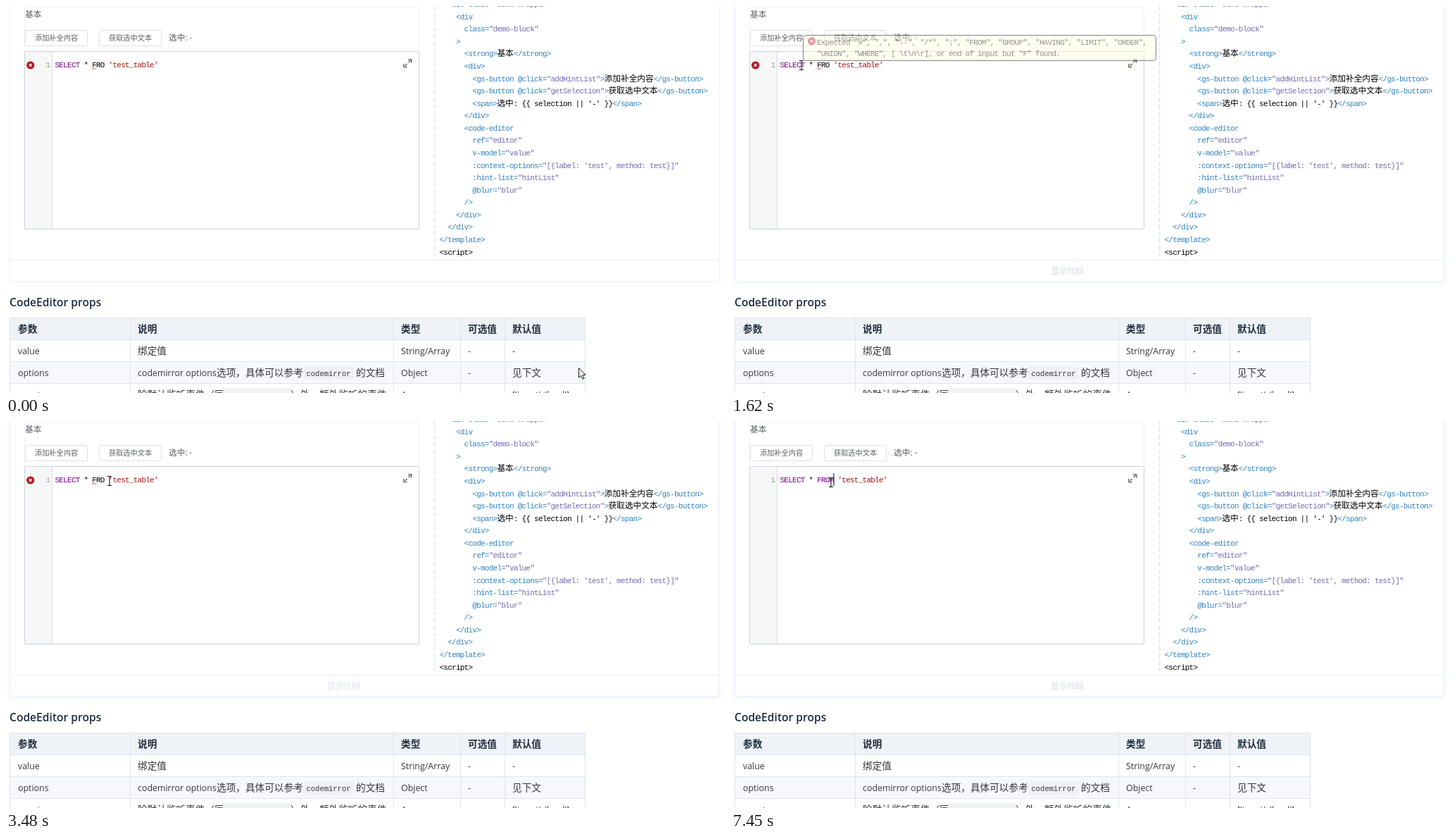
Recreate the animation shown at these times as an HTML page. Size 1021x549 px, loop 7.99 s.

```html
<!DOCTYPE html>
<html lang="zh">
<head>
<meta charset="utf-8">
<title>CodeEditor</title>
<style>
html, body { margin: 0; width: 100%; height: 100%; overflow: hidden; background: #fff; }
svg { display: block; }
text { white-space: pre; }
.ui { font: 12.4px 'Open Sans', 'Noto Sans', sans-serif; fill: #33363b; }
.ui .zh { font-family: 'Noto Sans CJK SC', 'Noto Sans CJK', sans-serif; font-size: 13.65px; }
.th { font-weight: 700; fill: #1f2d3d; }
.small { font: 11.7px 'Noto Sans CJK SC', 'Noto Sans CJK', sans-serif; fill: #5c5f66; }
.btn { font-size: 10.2px; }
.code { font: 11px 'Liberation Mono', monospace; letter-spacing: -.75px; }
.code .zh { font: 11.7px 'Noto Sans CJK SC', 'Noto Sans CJK', sans-serif; letter-spacing: 0; }
.chip { font: 10.5px 'Liberation Mono', monospace; fill: #33363b; }
.h { font: 600 15.6px 'Open Sans', 'Noto Sans', sans-serif; fill: #1f2d3d; }
#shadow { filter: drop-shadow(0 0 3px rgba(232,237,250,.6)) drop-shadow(0 2px 2px rgba(232,237,250,.5)); }
#hint { filter: drop-shadow(2px 3px 2px rgba(0,0,0,.2)); }
</style>
</head>
<body>
<svg id="stage" width="1021" height="549" viewBox="0 0 1021 549"></svg>
<script>
const LOOP = 7990;
const esc = s => s.replace(/&/g, '&amp;').replace(/</g, '&lt;').replace(/>/g, '&gt;');
const mix = s => esc(s).replace(/[\u3000-\u9fff\uff00-\uffef]+/g, m => `<tspan class="zh">${m}</tspan>`);
const run = (s, fill) => `<tspan fill="${fill}">${mix(s)}</tspan>`;
const text = (x, y, s, cls, more = '') => `<text x="${x}" y="${y}" class="${cls}" ${more}>${mix(s)}</text>`;
const rect = (x, y, w, h, fill, stroke = 'none', r = 0, more = '') =>
  `<rect x="${x}" y="${y}" width="${w}" height="${h}" rx="${r}" fill="${fill}" stroke="${stroke}" ${more}/>`;
const line = (d, stroke, more = '') => `<path d="${d}" fill="none" stroke="${stroke}" ${more}/>`;
const badge = (x, y, fill) => `<circle cx="${x}" cy="${y}" r="5.6" fill="${fill}"/>` +
  line(`M${x - 2} ${y - 2}l4 4m0-4l-4 4`, '#fff', 'stroke-width="1.2"');

// Template listing: [indent, text]
const listing = [
  [1, '<div class="demo-wrapper">'], [2, '<div'], [3, 'class="demo-block"'], [2, '>'],
  [3, '<strong>基本</strong>'], [3, '<div>'],
  [4, '<gs-button @click="addHintList">添加补全内容</gs-button>'],
  [4, '<gs-button @click="getSelection">获取选中文本</gs-button>'],
  [4, "<span>选中: {{ selection || '-' }}</span>"],
  [3, '</div>'], [3, '<code-editor'], [4, 'ref="editor"'], [4, 'v-model="value"'],
  [4, ':context-options="[{label: \'test\', method: test}]"'],
  [4, ':hint-list="hintList"'], [4, '@blur="blur"'], [3, '/>'],
  [2, '</div>'], [1, '</div>'], [0, '</template>']
];

function drawListing() {
  let inTag = false, out = '';
  listing.forEach(([indent, s], i) => {
    let runs = '';
    for (const part of s.match(/"[^"]*"|[<>]|[^"<>]+/g)) {
      if (part === '<') inTag = true;
      runs += run(part, !inTag ? '#000' : part[0] === '"' ? '#756bb1' : '#3182bd');
      if (part === '>') inTag = false;
    }
    out += `<text x="${615.5 + indent * 11.7}" y="${(1 + i * 17.58).toFixed(1)}" class="code">${runs}</text>`;
  });
  return out + text(615.5, 352.6, '<script>', 'code');
}

function drawTable() {
  const edge = '#dfe4ec';
  let out = rect(5.5, 442.5, 817, 31, '#eff2f7') + rect(5.5, 504.5, 817, 31, '#f7f8fc');
  out += line('M5.5 549V442.5H822.5V549M5.5 473.5H822.5M5.5 504.5H822.5M5.5 535.5H822.5' +
    [176, 550, 645, 708].map(x => `M${x}.5 442V549`).join(''), edge);
  const cols = [17, 187, 561, 656, 719];
  const row = (y, cells, cls) => cells.forEach((s, i) => out += text(cols[i], y, s, cls));
  row(463, ['参数', '说明', '类型', '可选值', '默认值'], 'ui th');
  row(494, ['value', '绑定值', 'String/Array', '-', '-'], 'ui');
  row(525, ['options', 'codemirror options', 'Object', '-', '见下文'], 'ui');
  row(556, ['events', '除默认监听事件（同', 'Array', '-', "['input', 'load']"], 'ui');
  out += text(299, 525, '选项，具体可以参考', 'ui') + rect(422, 511, 72, 19, '#eff1f5', 'none', 3) +
    text(426.5, 524.5, 'codemirror', 'chip') + text(497, 525, '的文档', 'ui');
  out += rect(308, 542, 97, 19, '#eff1f5', 'none', 3) + text(312, 555.5, 'onevents.Array', 'chip') +
    text(404, 556, '）外，额外监听的事件', 'ui');
  return out;
}

const button = (x, s) => rect(x + .5, 34.5, 88, 22, '#fff', '#dcdfe6', 2) + text(x + 14, 49.3, s, 'small btn');

document.getElementById('stage').innerHTML =
  rect(5.5, -20.5, 1007, 411, '#fff', 'none', 3, 'id="shadow"') +
  rect(5.5, -20.5, 1007, 411, '#fff', '#eaeefb', 3) +
  line('M6 360.5H1012', '#eaeefb') +
  line('M608.5 0V355', '#dfe4fa', 'stroke-width="1.6" stroke-dasharray="6 4"') +
  text(454, 380.3, '显示代码', 'small', 'id="label" style="fill:#d0d8e2"') +
  line('M26.5 64V4.5q0-3 3-3H583.5q3 0 3 3V64', '#eff1f8') +
  text(27, 16.3, '基本', 'small') + button(27, '添加补全内容') + button(132, '获取选中文本') +
  text(231, 49, '选中: -', 'small') +
  rect(26.5, 64.5, 560, 252, '#fff', '#cbcfe0', 1) +
  rect(27, 65, 38, 251, '#f6f7f7') + line('M65.5 65V316', '#dcdde2') +
  text(56.5, 87, '1', 'code', 'fill="#999"') +
  line('M566.5 85L569.5 82M571.5 80L574.5 77M571 75.8H575.7V80.5M564.8 82V86.7H569.5', '#62574b', 'stroke-width="1.3"') +
  `<g id="error">${badge(34.7, 84, '#b0151c')}${line('M122 89.8l1.5-1.5 1.5 1.5 1.5-1.5 1.5 1.5', '#e02020')}</g>` +
  '<circle id="press" r="9.5" fill="#fbe63c" opacity=".9"/>' +
  '<text id="query" x="69.5" y="87" class="code"></text>' +
  rect(0, 74, 1, 18, '#000', 'none', 0, 'id="caret"') +
  `<g id="hint">${rect(122.5, 94.5, 35, 18, '#fff', '#c0c0c0', 3)}${rect(125, 97, 30, 13, '#08f', 'none', 2)}` +
  '<text x="129" y="107" class="code" style="font-size:10px" fill="#fff">FROM</text></g>' +
  drawListing() +
  text(5, 425.5, 'CodeEditor props', 'h') + drawTable() +
  `<g id="tip">${rect(.5, .5, 501, 36, '#ffffe1', '#000', 4)}${badge(12.5, 8.8, '#c8323a')}` +
  text(20, 14.2, 'Expected "#", ",", "--", "/*", ";", "FROM", "GROUP", "HAVING", "LIMIT", "ORDER",', 'code', 'fill="#222"') +
  text(20, 30.4, '"UNION", "WHERE", [ \\t\\n\\r], or end of input but "F" found.', 'code', 'fill="#222"') + '</g>' +
  '<g id="arrow"><path d="M1.5-.5V13L4.6 10.2 6.8 15.2 9 14.2 6.8 9.4H11Z" fill="#fff" stroke="#111"/></g>' +
  `<g id="beam">${line('M-3-6.5H-1Q0-6.5 0-5.5V5.5Q0 6.5-1 6.5H-3M3-6.5H1Q0-6.5 0-5.5M0 5.5Q0 6.5 1 6.5H3', '#111', 'stroke-width="1.1"')}</g>` +
  '<g id="hand"><path d="M-.5 9V1.2a1.6 1.6 0 0 1 3.2 0V6.5l2 .3 2 .5 2 .7 1 1.5v4l-1.5 3v2.5H1v-2l-3-4-2.5-3.5q.5-2 2.3-.6z" fill="#fff" stroke="#111"/>' +
  line('M2.7 6.5V10M4.9 7V10M7 7.5V10', '#111', 'stroke-width=".8"') + '</g>';

const el = {};
document.querySelectorAll('[id]').forEach(n => el[n.id] = n);

// Pointer path: time, x, y
const path = [
  [30, 812, 514], [780, 119, 82], [870, 119, 82], [920, 122, 82], [1090, 122, 82], [1150, 125, 84],
  [1440, 125, 84], [1940, 42, 84], [2020, 35, 82], [2570, 35, 82], [2640, 40, 87], [2680, 40, 87],
  [2780, 133, 97], [2930, 133, 97], [2990, 136, 97], [3070, 136, 97], [3140, 150, 92], [3320, 149, 77],
  [3480, 147, 85], [3700, 147, 85], [4030, 134, 84], [4120, 134, 84], [4390, 120, 84], [4600, 120, 84],
  [5130, 140, 87], [5460, 140, 87], [5520, 142, 87]
];
const clamp = v => Math.max(0, Math.min(1, v));

function pointer(t) {
  const i = path.findIndex(k => k[0] > t);
  if (i === 0) return path[0].slice(1);
  if (i < 0) return path[path.length - 1].slice(1);
  const [a, b] = [path[i - 1], path[i]];
  const u = (t - a[0]) / (b[0] - a[0]), s = u * u * (3 - 2 * u);
  return [a[1] + (b[1] - a[1]) * s, a[2] + (b[2] - a[2]) * s];
}

// cubic-bezier(.25, .1, .25, 1)
function ease(x) {
  x = clamp(x);
  const bez = (p, q, u) => 3 * p * u * (1 - u) ** 2 + 3 * q * u * u * (1 - u) + u ** 3;
  let lo = 0, hi = 1;
  for (let i = 0; i < 18; i++) {
    const m = (lo + hi) / 2;
    if (bez(.25, .25, m) < x) lo = m; else hi = m;
  }
  return bez(.1, 1, lo);
}
const fade = (t, from, to, len) => t < to ? ease((t - from) / len) : 1 - ease((t - to) / len);
const show = (n, on) => n.setAttribute('visibility', on ? 'visible' : 'hidden');
const move = (n, x, y) => n.setAttribute('transform', `translate(${x} ${y})`);
const within = (t, ...spans) => spans.some(([a, b]) => t >= a && t < b);

let shown = '';
function render(t) {
  const [x, y] = pointer(t).map(Math.round);
  const onLine = y > 64 && y < 94;
  const kind = onLine && x > 66 && x < 587 ? 'beam' : onLine && x > 27 && x < 43 ? 'hand' : 'arrow';
  for (const k of ['beam', 'hand', 'arrow']) { show(el[k], k === kind); move(el[k], x, y); }

  const hover = Math.max(fade(t, 292, 3080, 300), ease((t - 3330) / 300));
  el.shadow.setAttribute('opacity', hover);
  el.label.setAttribute('opacity', hover);
  move(el.label, 10 * (1 - hover), 0);

  const tip = Math.max(fade(t, 1220, 1500, 400), fade(t, 1880, 2790, 400));
  el.tip.setAttribute('opacity', tip);
  show(el.tip, tip > .02);
  move(el.tip, x + 2, y - 43);

  show(el.press, within(t, [5080, 5350]));
  move(el.press, x - 2, y);
  show(el.caret, within(t, [5130, 5830], [6290, 6810], [7310, LOOP]));
  el.caret.setAttribute('x', t < 6290 ? 140 : 145.5);
  show(el.hint, within(t, [6290, 7450]));
  show(el.error, t < 6930);

  const word = t < 6290 ? 'FRO' : t < 7450 ? 'FROm' : 'FROM';
  if (word !== shown) {
    shown = word;
    el.query.innerHTML = run('SELECT', '#770088') + run(' * ', '#000') +
      run(word, word.length > 3 ? '#770088' : '#000') + run(" 'test_table'", '#aa1111');
  }
}

function tick() {
  render(performance.now() % LOOP);
  requestAnimationFrame(tick);
}
tick();
</script>
</body>
</html>
```
